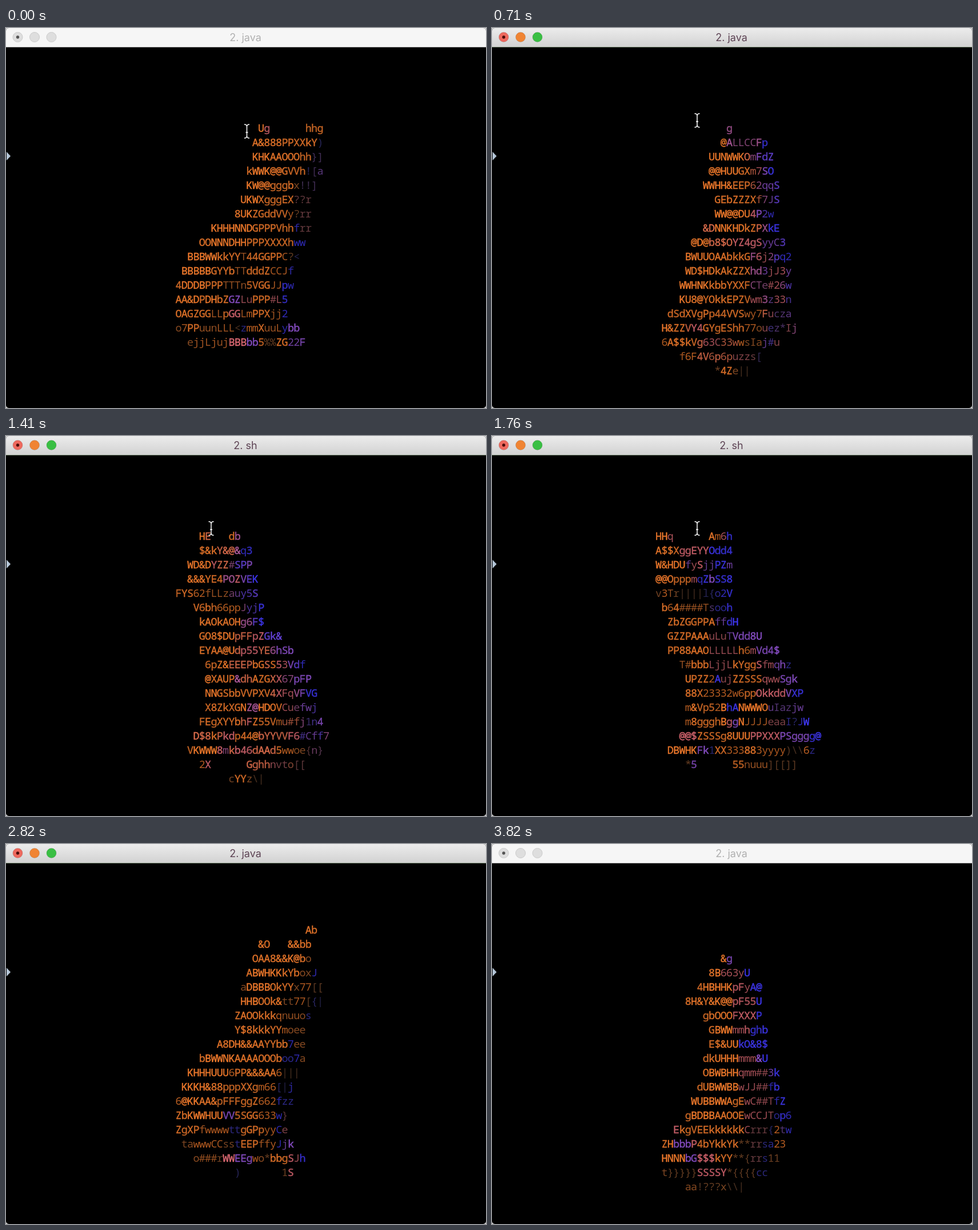
These frames come from a looping animation (840x666 px, 4820 ms). An HTML page:

```html
<!DOCTYPE html>
<html lang="en">
<head>
<meta charset="utf-8">
<title>Terminal</title>
<style>
html, body { margin: 0; width: 100%; height: 100%; overflow: hidden; background: #ddd; }
#window { position: absolute; width: 840px; height: 666px; background: #000; border-radius: 5px; overflow: hidden; }
#bar { height: 33px; background: linear-gradient(#ececec, #d2d2d2); border-bottom: 1px solid #74846f;
  font: 18px/33px Inter, sans-serif; color: #5d4354; text-align: center; text-indent: -2px; }
#window.idle #bar { background: #f6f6f6; border-color: #a2a2a2; color: #b0b0b0; }
#screen { position: absolute; left: 265.4px; top: 112px; margin: 0; font: 18.5px/25px "Noto Sans Mono", monospace;
  letter-spacing: -.77px; font-variant-ligatures: none; }
#screen b { font-weight: normal; -webkit-text-stroke: .45px; }
svg { position: absolute; left: 0; top: 0; }
.light { stroke: #0002; }
.idle .light { fill: #dedede; stroke: #cbcbcb; }
.idle #dot { fill: #555; }
</style>
</head>
<body>
<div id="window">
  <div id="bar"></div>
  <pre id="screen"></pre>
  <svg width="840" height="666">
    <circle class="light" cx="20.5" cy="16" r="8.5" fill="#ee695e"/>
    <circle class="light" cx="50" cy="16" r="8.5" fill="#f08433"/>
    <circle class="light" cx="79.5" cy="16" r="8.5" fill="#39bf43"/>
    <circle id="dot" cx="20.5" cy="16" r="2.7" fill="#4a0d0a"/>
    <path d="M1 217L8 224.500L1 232Z" fill="#b4c5d6"/>
    <path id="beam" d="M-4.500-12Q0-12 0-8V8Q0 12-4.500 12M4.500-12Q0-12 0-8M0 8Q0 12 4.500 12M-2 2H2" fill="none" stroke="#fff" stroke-width="1.5"/>
    <path id="resize" d="M385 667L390 662L395 667" fill="none" stroke="#fff" stroke-width="2"/>
  </svg>
</div>
<script>
const LOOP = 4820, STEP = 3820 / 65, LAST = 65;

// Glyphs from faint to bright, and the light colours from left to right.
const RAMP = String.raw`|\i<l!)([]{}?*%r1vcstxIzeaonTu#jLfJC7wy23mq65pFhgdSV4PXEGYZbkOA8$&@UDHKNBW`;
const LIGHTS = [[240, 122, 44], [222, 106, 116], [146, 84, 212], [64, 56, 244]];
const MARKS = ".-+="; // switch to the light of the same index

const poses = {
  back: pose(5, String.raw`
                 U-g      .hhg
                A&888PPXXkY=)
                KHKAAOOOhh+}]
               kWWK@@GVVh=!+[a
               KW@@gggbx+!!]
              UKWXgggEX-??r
             8UKZGddVVy?-rr
         KHHHNNDGPPPVhh=f-rr
       OONNNDHHPPPXXXXh=ww
     BBBWWkkYYT44GGPPC?=<
    BBBBBGYYbTTdddZCCJ=f
   4DDDBPPPTTTn5VGGJJ=pw
   AA&DPDHbZ+GZ-Lu.PPP-#L=5
   OAGZGGLLp-GG.LmPPXjj=2
   o7PPuunLLL<=z.mmXuuL=y+bb
     ejjLjuj-BBB+bb.5%%ZG+22F`),
  side: pose(5, String.raw`
                =a
               DD=k     .88=k
              KNNNUU8-h+p6d=EP
               BWNUU44-uu+g=4
               BBB8E44-u+T#=h
               HD&&bbu-u+nT
              WW&&K$U+J=d#}
          -$$.UUU88KGP-q+#=JVd
       BBB-ZZGGddV226+TTT#=J
     BBWWW44ddVVd+LLu-II=Cwo
    BWWWWD4ddVVh+CjL#.IIL+n
   UBBWDDdddVVhh+JCTT.Ijj+u
   BBBHSShhhVhhh+#y=hn.jj+L
  gXXXdqAhhgggwLLT-g+%%z=j
$$EEghhOOggwwwwLL)+%wz*.j=&
 d444gyferrrrrI|))+ddd
     )affrIIIII=|`),
  front: pose(5, String.raw`
            $
           kUK=7
        @$WWK-L+gZ
       88NN&ZZX-g+G=W
    BBBNWObbXX-g+Sgh
        dgkZPPX-q+6m=&
          KWKKKK-G+p=k
         8KHWKU@@@=AH
         8UZHBB-$$bb+ggX
         &@bBWWD8O-b.Z-5+E=hV
         DZbHWWD888-kk+6ggd
         WW&DWHHH8&S-qn+p6=S4
        AGZUkHHHH&Sqqm-n+pp=o
      PdgbOAVSSSOOmmm66+tt-a
     KA88-d+8X.hhqkkkmm6m=!+1tt.<
     #$WWW$-$+88X-&&&.Ymm6+?=!.<
      OOOO-$$UUU88+###-6+??
         1vGGGGGI\\||`),
  turned: pose(5, String.raw`
  HH-q      .Am-6=h
  A$$X-ggEYY=Odd4
  W&HDU+f-yS+jj=PZ+m
  @@Oppp-m=qZ+b=SS8
  v3Tr||||=l{o2V
   b64####T+s=ooh
    ZbZGGPPA+ff=dH
    GZZPAAA-uLu+TVdd8U
    PP88AAO-LLLLL.h6-m+Vd4$
      T#bbb-LjjL.kYgg-Sfm+qh=z
       UPZZ2=A-uj.ZZSSS-qww+Sgk
       88X23332w6pp-Okkdd+V=XP
       m&Vp52B=hA.NWWWO+uIazjw
       m8ggghB-g+g.NJJJJ-eaa=I?JW
      -@@$.ZSSSg8UUU-PPXXX+PSggg=g@
    DBWHK+Fk=1.XX333883yyyy)\\6=z
       *+5      .55nuuu][[]]`),
  tail: pose(3, String.raw`
        =w
       Lm+Ff
       L6k+ww   .b=U
       -6pp.$$$USqy=Y+g
      YZ8U@SSSmmggEOkkt
      bO&yff5m888&&AG=rs
      POffffww*}??|||
       XXdddVC*=iiii
        gdVVhLL=Fp6
       $$ghhLLj-u=Fp
       UUUhLj$-tt+n=Fp
       wwwo[[???]=nzbb
       m62ealllAz=7f4Z@
        YY-zzl.OOO77=wT+hh$
       AbbZ-z#.Xkk!=s+y-5hgg
        yZZ7-#.gk-III.hh5b+$=HDWA
         PP-#+].&b-I.u=J.gggg77-m=w
         @-qhh44+kY=b.SStttt=[
        KK-PPg.DAA-E+Z`),
  backAgain: pose(4, String.raw`
                         Ab
                 &O   &&bb
                OAA8&&K@bo
               ABWHKKkYbox=J
              aDBBBOkYYx77[[
              HHBOOk&tt77[={|
             ZAOOkkkqnuuo=s
             Y$8kkkYYmoee
          A8DH&&AAYYbb=7.ee
       bBWWNKAAAAOOOb=oo7.a
     KHHHUUU6PP&&&AA6|||
    KKKH&88pppXXgm66=[|j
   6@KKAA&pFFFggZ662=fzz
   ZbKWWHUU+VV.5SGG633=w-}
   ZgXPfwwww=tt.gGPpyy=C-e
    tawwwCCss=t.EEPffy=J+jk
      o###r-WW+EEg.wo*bbg-SJ=h
             =)       .1-S`),
  frontAgain: pose(6, String.raw`
             &+g
           8B-663y=U
         4HBHHK-pFy=A@
       8H&Y&K@@-pF55=U
          gbOOO-FXXX=P
           GBWW-mmh=ghb
           E$&UU=kO&8$
          dkUHHH-mmm+&=U
          OBWBHH-qmm##+3=k
         dUBWWBB-wJJ##=fb
        WUBBWWAgE-wC##T=fZ
       gBDBBAAOOE-wCCJT=op6
     -E.kgVEEkkkkkk-Crrr={.2+t=w
   ZH+bbb-P.4bYkkYk**-rr=sa.23
   HNNN+bG-$$$.kYY**{-rr=s.11
   t}}}}}-SSSSY.*{{{{=cc
       aa!???x\\|`)
};

// One turn takes 47 steps, so the side view returns at step 53.
const timeline = [
  [0, poses.back], [6, poses.side], [18, poses.front], [30, poses.turned], [37, poses.tail],
  [48, poses.backAgain], [53, poses.side], [LAST, poses.frontAgain]
];

function pose(firstRow, art) {
  const rows = [];
  art.slice(1).split("\n").forEach((line, i) => {
    const left = line.search(/\S/), cells = [];
    let light = 0;
    for (const glyph of line.trim()) {
      const mark = MARKS.indexOf(glyph);
      if (mark >= 0) light = mark;
      else cells.push({ glyph, light, level: RAMP.indexOf(glyph) / (RAMP.length - 1) });
    }
    rows[firstRow - 3 + i] = { left, cells };
  });
  return rows;
}

const $ = id => document.getElementById(id);
const lerp = (a, b, p) => a + (b - a) * p;
const clamp = (x, lo, hi) => Math.min(hi, Math.max(lo, x));
const noise = seed => { const s = Math.sin(seed * 12.9898) * 43758.5453; return s - Math.floor(s); };

function glyphFor(level, seed) {
  const i = Math.round(level * (RAMP.length - 1) + (noise(seed) - .5) * 8);
  return RAMP[clamp(i, 0, RAMP.length - 1)];
}

function blendRows(a, b, p, seed) {
  if (!a && !b) return;
  const empty = row => ({ left: row.left + row.cells.length / 2, cells: [] });
  a = a || empty(b);
  b = b || empty(a);
  const width = Math.round(lerp(a.cells.length, b.cells.length, p)), cells = [];
  for (let i = 0; i < width; i++) {
    const pick = row => row.cells[Math.floor((i + .5) / width * row.cells.length)];
    const from = pick(a) || pick(b), to = pick(b) || from;
    const level = lerp(from.level, to.level, p);
    const blank = level < 0 || (p < .5 ? from : to).glyph === " ";
    cells.push({
      glyph: blank ? " " : glyphFor(level, seed + (i >> 1)),
      level: clamp(level, 0, 1),
      light: lerp(from.light, to.light, p)
    });
  }
  return { left: Math.round(lerp(a.left, b.left, p)), cells };
}

function poseAt(step) {
  const next = timeline.findIndex(([at]) => at > step);
  if (next < 0) return poses.frontAgain;
  const [start, a] = timeline[next - 1], [end, b] = timeline[next];
  if (step === start) return a;
  const p = (step - start) / (end - start);
  return Array.from({ length: 20 }, (_, r) => blendRows(a[r], b[r], p, step * 997 + r * 31));
}

// Faint glyphs are darker and greyer.
function cellHtml({ glyph, level, light }) {
  if (glyph === " ") return " ";
  const i = Math.min(2, Math.floor(light));
  const shine = .44 + .56 * level, tint = Math.min(1, .45 + 1.1 * level);
  const rgb = LIGHTS[i].map((c, k) =>
    Math.round(lerp(95, lerp(c, LIGHTS[i + 1][k], light - i), tint) * shine));
  const tag = level > .6 ? "b" : "span";
  return `<${tag} style="color:rgb(${rgb})">&#${glyph.charCodeAt(0)};</${tag}>`;
}

function rowHtml(row) {
  return row ? " ".repeat(row.left) + row.cells.map(cellHtml).join("") : "";
}

function moveCursor(step) {
  const slide = clamp(step / 5, 0, 1), drop = clamp((step - 31) / 5, 0, 1);
  const x = lerp(421.5, 359, slide) + 28 * drop;
  const y = lerp(181, 162, slide) + 422 * drop ** 1.5;
  $("beam").setAttribute("transform", `translate(${x} ${y})`);
  $("beam").style.display = step < 37 ? "" : "none";
  $("resize").style.display = step === 37 ? "" : "none";
}

let shown = -1;
function draw() {
  const time = performance.now() % LOOP;
  const step = Math.min(LAST, Math.floor((time + 5) / STEP));
  if (step !== shown) {
    shown = step;
    $("window").className = step < 2 || step === LAST ? "idle" : "";
    $("bar").textContent = step >= 24 && step < 33 ? "2. sh" : "2. java";
    $("screen").innerHTML = Array.from(poseAt(step), rowHtml).join("\n");
    moveCursor(step);
  }
  requestAnimationFrame(draw);
}
draw();
</script>
</body>
</html>
```
